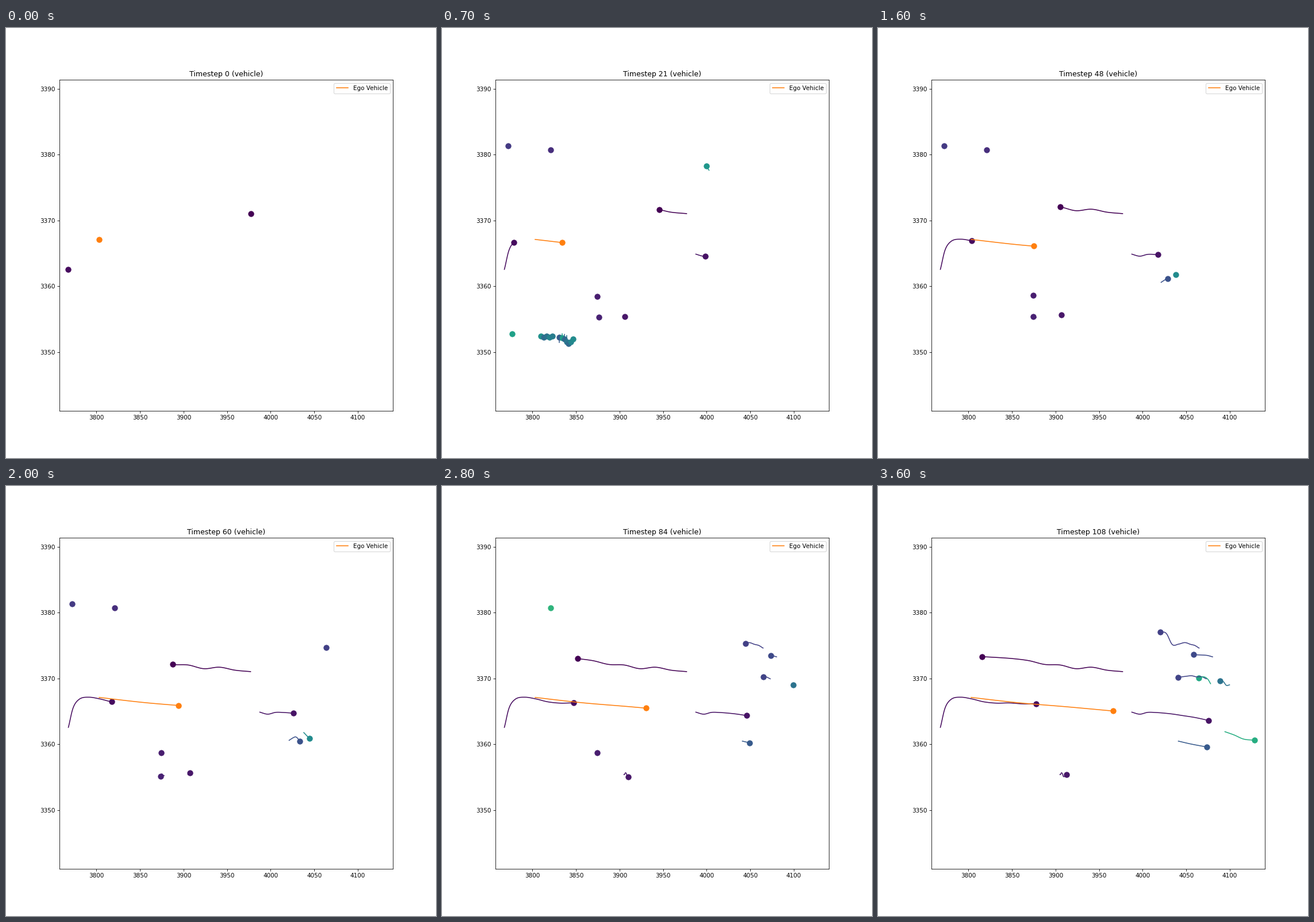
Recreate the animation shown at these times as a matplotlib script. Size 748 by 748 pixels, loop 3.7 s.

```python
import numpy as np
import matplotlib.pyplot as plt
from matplotlib.animation import FuncAnimation

SIZE = 748
FRAMES = 37
STEP = 3          # timesteps per frame
LAST = (FRAMES - 1) * STEP
EGO = "tab:orange"

fig, ax = plt.subplots(figsize=(10, 10), dpi=SIZE / 10)
fig.subplots_adjust(left=0.1243, right=0.9, bottom=0.11, top=0.8792)
ax.set_xlim(3757.45, 4140.48)
ax.set_ylim(3341.09, 3391.36)
to_data = ax.transData.inverted()
title = ax.set_title("Timestep 0 (vehicle)")


def smooth(u, *vals):
    """Cubic Hermite curve through evenly spaced values, u from 0 to 1."""
    v = np.array(vals, float)
    if len(v) == 1:
        return np.full(len(u), v[0])
    slope = np.gradient(v)
    s = np.clip(u, 0, 1) * (len(v) - 1)
    i = np.minimum(s.astype(int), len(v) - 2)
    f = s - i
    ease = f * f * (3 - 2 * f)
    return (v[i] + (v[i + 1] - v[i]) * ease
            + f * (1 - f) ** 2 * slope[i] - f * f * (1 - f) * slope[i + 1])


class Track:
    """A dot with the trail of its past; xs and ys are stage pixels,
    each spread evenly in time from start to stop. It vanishes at end."""

    def __init__(self, color, start, xs, ys, stop=LAST, end=LAST + 1):
        color = plt.cm.viridis(color) if isinstance(color, float) else color
        self.start, self.end = start, end
        u = np.arange(LAST + 1 - start) / (stop - start)
        x, y = smooth(u, *xs) - 0.5, smooth(u, *ys) + 0.4
        self.path = to_data.transform(np.column_stack([x, SIZE - y]))
        self.line, = ax.plot([], [], color=color)
        self.dot = ax.scatter([0], [0], s=80, color=[color])

    def show(self, t):
        alive = self.start <= t < self.end
        self.line.set_visible(alive)
        self.dot.set_visible(alive)
        if alive:
            past = self.path[:t - self.start + 1]
            self.line.set_data(*past.T)
            self.dot.set_offsets(past[-1:])


tracks = [
    # long drives
    Track(0.0, 0, (426, 182),
          (322.5, 320, 314.8, 317.4, 311, 310, 303.5, 300, 298, 296.5)),
    Track(0.03, 0, (109, 122, 145, 174, 206, 241, 275.5),
          (419.5, 386.5, 370, 367, 370, 375, 377.3, 377, 378.6, 378.2)),
    Track(0.05, 6, (442, 464, 486, 509, 536.5, 575),
          (393, 396.5, 393.4, 393.6, 394.6, 396.2, 398.7, 402, 407.3)),

    # slow or parked
    Track(0.06, 3, (317, 318.7, 320.2, 323.7, 328.5),
          (501.5, 501.5, 499.5, 498.5, 499.5, 505, 504.3, 501.7)),
    Track(0.08, 3, (270, 271), (468, 463.5), stop=60, end=90),
    Track(0.09, 3, (275.5, 269.5), (503.3, 502.5, 500.5, 505), stop=60, end=72),
    Track(0.13, 6, [189.5], [212], end=78),
    Track(0.17, 6, [115.5], [204.5], end=66),
    Track(0.65, 78, [189.5], [212], end=99),

    # east side
    Track(0.19, 59, (559, 541, 516, 491.5),
          (281.5, 277, 275, 272, 274.7, 275.5, 256, 253.3)),
    Track(0.2, 74, (571.5, 557.5, 542.5, 522.5),
          (335, 331.3, 331.6, 329.7, 330.8, 332.5)),
    Track(0.22, 72, (582.5, 573, 562.5, 549.5), (296.8, 294.3, 293.6, 293)),
    Track(0.25, 30, (493, 501, 505.5, 512), (442, 437, 436.5, 443.2),
          stop=60, end=72),
    Track(0.28, 74, (523, 545.5, 573), (443.4, 453.7)),
    Track(0.38, 83, (612, 605, 600, 596), (345.5, 346.5, 341, 338.7, 338.3)),
    Track(0.48, 48, (518.5, 528), (428.5, 438.5), stop=60, end=72),
    Track(0.53, 15, (465, 459, 454, 451.5, 450), (247, 238, 227, 212, 206),
          stop=45, end=45),
    Track(0.6, 88, (579, 574, 567, 559), (343.5, 335.5, 331.5, 334)),
    Track(0.62, 90, (604, 620, 637, 656), (427, 432.7, 440, 441.7)),
    Track(0.7, 93, [607], [335], end=102),
]

# south-west crowd: a short row, an arc dipping in the middle, a straggler
crowd = [Track(c, 9 + i, [172.5 + 5 * i], [536 + 2 * (i % 2)], end=27)
         for i, c in enumerate((0.51, 0.35, 0.38, 0.45, 0.42))]
arc = zip((0.29, 0.55, 0.33, 0.40, 0.34, 0.46, 0.48), (9, -7, -8, -11, 2, 2, 0))
for i, (c, drift) in enumerate(arc):
    y = 538 + 11 * np.exp(-((i - 4) / 1.7) ** 2)
    crowd.append(Track(c, 12, [205 + 4 * i], (y + drift, y), stop=21,
                       end=45 if c < 0.47 else 30))
crowd.append(Track(0.57, 18, [122.5], [532], end=27))

ego = Track(EGO, 0, (162.5, 244, 328, 409.5), (367.4, 376.6, 383.6, 391))
tracks += crowd + [ego]

ax.legend(handles=[plt.Line2D([], [], color=EGO, label="Ego Vehicle")],
          loc="upper right")


def update(frame):
    t = frame * STEP
    title.set_text(f"Timestep {t} (vehicle)")
    for track in tracks:
        track.show(t)


anim = FuncAnimation(fig, update, frames=FRAMES, interval=100,
                     repeat=True, repeat_delay=0)
plt.show()
```
